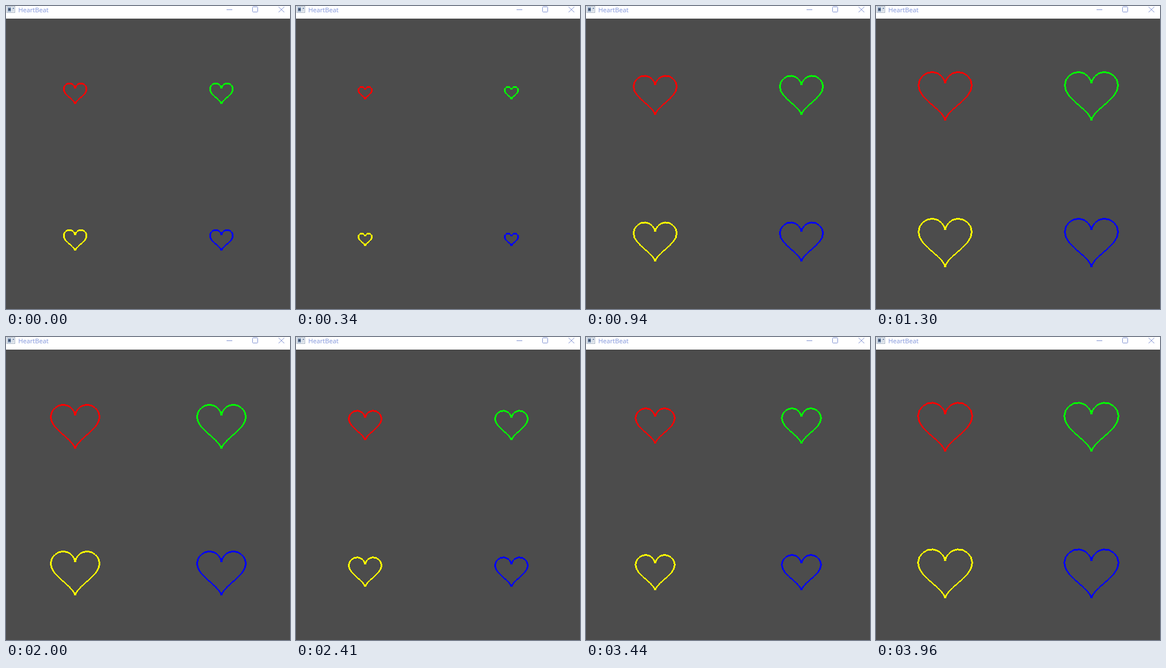
An HTML page with a canvas for the animation above (4.01 s loop, 497 by 529 pixels).

```html
<!DOCTYPE html>
<html lang="en">
<head>
<meta charset="utf-8">
<title>HeartBeat</title>
<style>
  html, body { margin: 0; width: 100%; height: 100%; overflow: hidden; background: #4c4c4c; }
  canvas, svg { position: absolute; left: 0; top: 0; display: block; }
  text { font: 11.2px "Open Sans", "Noto Sans", sans-serif; fill: #7f93da; }
</style>
</head>
<body>
<canvas id="stage" width="497" height="529"></canvas>
<svg width="497" height="22" viewBox="0 0 497 22">
  <rect width="497" height="22" fill="#fff"/>
  <g shape-rendering="crispEdges">
    <rect x="1" y="0" width="15" height="12" fill="#a9b4c4"/>
    <rect x="2" y="1" width="13" height="10" fill="#f2f5f8"/>
    <rect x="3" y="2" width="6" height="8" fill="#8fa6c4"/>
    <rect x="4" y="4" width="4" height="4" fill="#43536f"/>
    <rect x="10" y="2" width="4" height="8" fill="#d5dde6"/>
    <rect x="12" y="3" width="2" height="2" fill="#6d83a8"/>
  </g>
  <text x="21.5" y="11">HeartBeat</text>
  <g fill="none" stroke="#8293d3">
    <path d="M386 6.5H396"/>
    <rect x="431.5" y="1.5" width="9" height="9" rx="1"/>
    <path d="M477 1.5L487 11M487 1.5L477 11"/>
  </g>
</svg>
<script>
const LOOP = 4010;
const PERIOD = 2600;   // one beat
const PEAK = 1554;     // time of the widest heart
const MIN_RADIUS = 7.8;
const SWELL = 40.7;
const POINTS = 36;
const hearts = [
  [121, 150, "#f00"], [377, 150, "#0f0"],
  [121, 406, "#ff0"], [377, 406, "#00f"],
];

// [step, start time]; steps between two knots are evenly spaced
const knots = [
  [0, 0], [1, 50], [11, 540], [12, 590], [22, 1090], [23, 1140], [33, 1660],
  [34, 1700], [40, 2000], [44, 2210], [45, 2260], [55, 2770], [56, 2820],
  [66, 3330], [67, 3390], [77, 3900], [78, 3960],
];
const starts = [0];
for (let i = 1; i < knots.length; i++) {
  const [s0, t0] = knots[i - 1], [s1, t1] = knots[i];
  for (let s = s0 + 1; s <= s1; s++) {
    starts.push(Math.round((t0 + (t1 - t0) * (s - s0) / (s1 - s0)) / 10) * 10);
  }
}

const outline = Array.from({ length: POINTS }, (_, i) => {
  const a = i * 2 * Math.PI / POINTS, c = Math.cos;
  return [Math.sin(a) ** 3, -(13 * c(a) - 5 * c(2 * a) - 2 * c(3 * a) - c(4 * a)) / 16];
});

const ctx = document.getElementById("stage").getContext("2d");

// Hard-edged line, three pixels thick across its minor axis
function line([x0, y0], [x1, y1]) {
  const steep = Math.abs(y1 - y0) > Math.abs(x1 - x0);
  let [a, b, c, d] = steep ? [y0, x0, y1, x1] : [x0, y0, x1, y1];
  if (a > c) [a, b, c, d] = [c, d, a, b];
  for (let p = Math.ceil(a - 0.5); p + 0.5 <= c; p++) {
    const q = Math.floor(b + (d - b) * (p + 0.5 - a) / (c - a));
    if (steep) ctx.fillRect(q - 1, p, 3, 1);
    else ctx.fillRect(p, q - 1, 1, 3);
  }
}

function draw(time) {
  const radius = MIN_RADIUS + SWELL * Math.abs(Math.cos(Math.PI * (time - PEAK) / PERIOD));
  ctx.fillStyle = "#4c4c4c";
  ctx.fillRect(0, 0, 497, 529);
  for (const [cx, cy, color] of hearts) {
    ctx.fillStyle = color;
    const points = outline.map(([x, y]) => [cx + x * radius, cy + y * radius]);
    points.forEach((p, i) => line(p, points[(i + 1) % POINTS]));
  }
}

const begin = performance.now();
function tick() {
  const time = (performance.now() - begin) % LOOP;
  draw(starts.findLast(s => s <= time + 0.5));
  requestAnimationFrame(tick);
}
tick();
</script>
</body>
</html>
```
